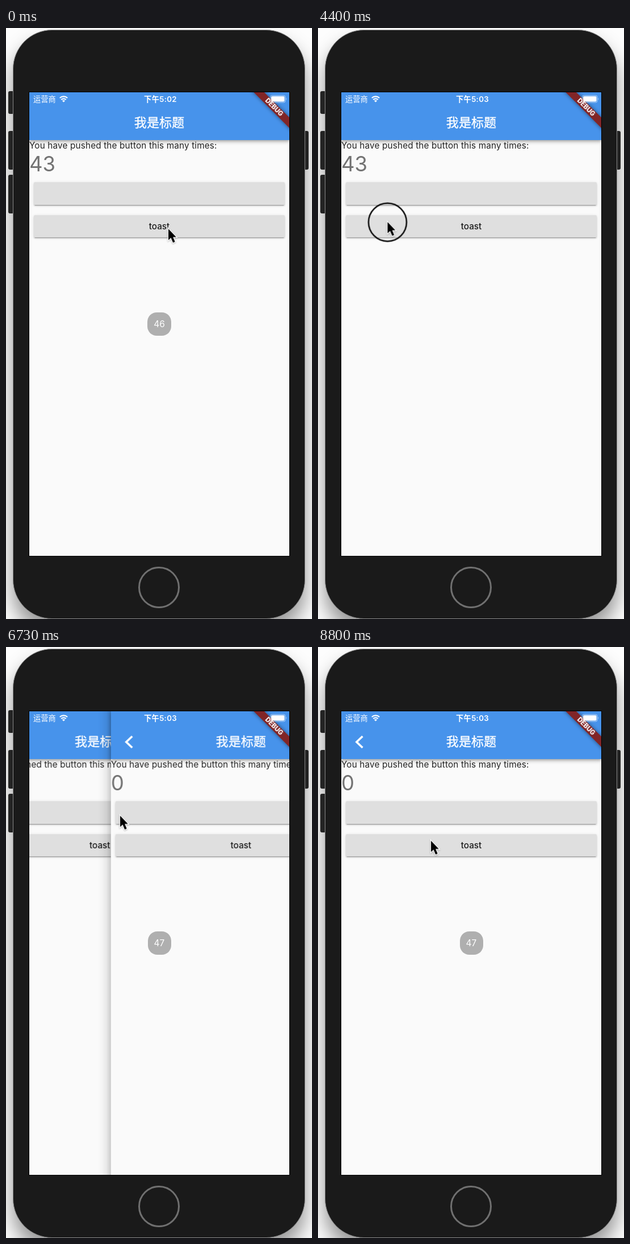
Recreate the animation shown at these times as an HTML page. Size 539 by 1039 pixels, loop 8940 ms.

```html
<!DOCTYPE html>
<html lang="zh-CN">
<head>
<meta charset="utf-8">
<title>Toast demo</title>
<style>
  :root { --loop: 8940ms; --blue: #4793eb; }
  * { box-sizing: border-box; }
  html, body { margin: 0; width: 100%; height: 100%; overflow: hidden; }
  body {
    position: relative;
    background: #fdfdfd;
    font: 15.3px Inter, "Noto Sans CJK SC", "Noto Sans CJK", sans-serif;
    color: #212121;
    white-space: nowrap;
  }
  body *, .page::before { position: absolute; }

  /* phone */
  .phone {
    left: 12px; top: 3px; width: 515px; height: 1036px;
    border-radius: 69px;
    background: #1a1a1a;
    border: 1px solid #8c8c8c;
    box-shadow: 0 22px 34px rgba(0, 0, 0, .42);
  }
  .key { left: 4px; width: 10px; height: 68px; border-radius: 3px; background: #2b2b2b; }
  .home {
    left: 232.5px; top: 946.5px; width: 73px; height: 73px;
    border: 3px solid #707070; border-radius: 50%;
  }
  .screen {
    left: 41px; top: 113px; width: 458px; height: 815px;
    overflow: hidden; background: #fafafa;
    box-shadow: 0 0 0 1px #000;
  }

  /* pages */
  .page { inset: 0; background: #fafafa; }
  .bar {
    left: 0; top: 0; width: 100%; height: 84px;
    background: var(--blue);
    box-shadow: 0 2px 4px -1px rgba(0, 0, 0, .2), 0 4px 5px rgba(0, 0, 0, .14), 0 1px 10px rgba(0, 0, 0, .12);
  }
  .title {
    left: 0; width: 100%; top: 38px; line-height: 30px;
    text-align: center; color: #fff;
    font-size: 22.1px; font-weight: 500;
    -webkit-text-stroke: .35px #fff;
  }
  .label { left: 0; top: 84px; line-height: 20px; letter-spacing: .15px; }
  .count {
    left: 0; top: 104px; line-height: 44px;
    font-size: 36.5px; letter-spacing: -.2px; color: #737373;
  }
  .button {
    left: 8px; width: 442px; top: 158px; height: 39.5px; line-height: 39.5px;
    border-radius: 2px; background: #dfdfdf;
    text-align: center; font-weight: 500; color: #1c1c1c;
    box-shadow: 0 3px 1px -2px rgba(0, 0, 0, .2), 0 2px 2px rgba(0, 0, 0, .14), 0 1px 5px rgba(0, 0, 0, .12);
  }
  .toast-button { top: 215.5px; }
  .back { left: 22px; top: 42px; }
  .old { animation: leave var(--loop) infinite; }
  .new { animation: enter var(--loop) infinite; }
  .new::before {
    content: ""; right: 100%; top: 0; width: 24px; height: 100%;
    background: linear-gradient(to left, rgba(0, 0, 0, .19), rgba(0, 0, 0, .065) 35%, rgba(0, 0, 0, .02) 70%, transparent);
  }
  @keyframes enter {
    0%, 73.535% { transform: translateX(490px); animation-timing-function: step-end; }
    73.536% { transform: translateX(458px); animation-timing-function: ease-out; }
    77.036%, 100% { transform: none; }
  }
  @keyframes leave {
    0%, 73.535% { transform: none; animation-timing-function: ease-out; }
    77.036%, 100% { transform: translateX(-152.7px); }
  }

  /* toasts */
  .toast {
    left: 208px; top: 387px; width: 42px; height: 41px; line-height: 41px;
    border-radius: 16.5px; background: #afafaf; color: #fff;
    text-align: center; font-size: 15.5px;
  }
  .first { animation: hide var(--loop) linear infinite; }
  .second { left: 208.5px; width: 41px; animation: show var(--loop) linear infinite; }
  @keyframes hide { 0%, 46.2% { opacity: 1; } 48.43%, 100% { opacity: 0; } }
  @keyframes show { 0%, 50% { opacity: 0; } 52.8%, 100% { opacity: 1; } }

  /* ribbon and status bar */
  .ribbon {
    left: 381.4px; top: 20.4px; width: 100px; height: 13.3px; line-height: 13.3px;
    transform: rotate(45deg);
    background: #812527; color: #fff;
    box-shadow: 0 0 7px rgba(0, 0, 0, .5);
    text-align: center; font-size: 11.2px; font-weight: 800;
  }
  .status { top: 2px; line-height: 20px; font-size: 13.3px; color: #fff; }
  .carrier { left: 7px; }
  .clock { left: 201px; width: 60px; text-align: center; font-weight: 600; letter-spacing: .3px; }
  .before { animation: until var(--loop) step-end infinite; }
  .after { animation: from var(--loop) step-end infinite; }
  @keyframes until { 0% { opacity: 1; } 13.42%, 100% { opacity: 0; } }
  @keyframes from { 0% { opacity: 0; } 13.42%, 100% { opacity: 1; } }
  .icons { left: 0; top: 0; }

  /* pointer */
  .pointer { left: 0; top: 0; overflow: visible; animation: move var(--loop) ease-in-out infinite; }
  .arrow { filter: drop-shadow(0 1.5px 1px rgba(0, 0, 0, .3)); }
  .ring { animation: press var(--loop) step-end infinite; }
  @keyframes move {
    0%, 36.35% { transform: translate(286px, 351.5px); }
    46.42%, 63.5% { transform: translate(122.5px, 339.5px); animation-timing-function: ease-in; }
    66.33% { transform: translate(151px, 327px); animation-timing-function: ease-out; }
    71.6%, 77.7% { transform: translate(201px, 295px); }
    81.7%, 100% { transform: translate(199px, 339px); }
  }
  @keyframes press {
    0% { opacity: 0; }
    48.43% { opacity: 1; }
    50.1% { opacity: 0; }
    72.4% { opacity: 1; }
    73.7%, 100% { opacity: 0; }
  }
</style>
</head>
<body>
  <div class="key" style="top:111px;height:40px"></div>
  <div class="key" style="top:181px"></div>
  <div class="key" style="top:258px"></div>
  <div class="key" style="top:181px;left:523px"></div>
  <div class="phone"></div>
  <div class="home"></div>

  <div class="screen">
    <div class="page old">
      <div class="bar"><div class="title">我是标题</div></div>
      <div class="label">You have pushed the button this many times:</div>
      <div class="count">43</div>
      <div class="button"></div>
      <div class="button toast-button">toast</div>
    </div>

    <div class="page new">
      <div class="bar">
        <div class="title">我是标题</div>
        <svg class="back" width="20" height="24" fill="none" stroke="#fff" stroke-width="3.6">
          <path d="M15.5 2L5 12L15.5 22"/>
        </svg>
      </div>
      <div class="label">You have pushed the button this many times:</div>
      <div class="count">0</div>
      <div class="button"></div>
      <div class="button toast-button">toast</div>
    </div>

    <div class="toast first">46</div>
    <div class="toast second">47</div>

    <div class="ribbon">DEBUG</div>
    <div class="status carrier">运营商</div>
    <div class="status clock before">下午5:02</div>
    <div class="status clock after">下午5:03</div>
    <svg class="icons" width="458" height="24">
      <g fill="none" stroke="#fff" stroke-width="2.2">
        <path d="M53.8 10A10 10 0 0 1 67.2 10"/>
        <path d="M56.3 13A6.2 6.2 0 0 1 64.7 13"/>
      </g>
      <path d="M60.5 17.4L58 14.9A3.6 3.6 0 0 1 63 14.9Z" fill="#fff"/>
      <rect x="424.5" y="5.5" width="26.5" height="12.5" rx="3" fill="none" stroke="#fff" stroke-opacity=".55"/>
      <rect x="426" y="7" width="23.5" height="9.5" rx="1.8" fill="#fff"/>
      <path d="M452.3 9.8Q454.3 11.7 452.3 13.7Z" fill="#fff" fill-opacity=".5"/>
    </svg>
  </div>

  <svg class="pointer" width="1" height="1">
    <circle class="ring" cy="2" r="33.5" fill="none" stroke="#000" stroke-width="2.4"/>
    <g transform="translate(0 1.5) scale(.9)">
      <path class="arrow" d="M0 0V22L5 17.6L9 27L13 25.3L9 16.2H15.3Z"
        stroke="#fff" stroke-width="3" paint-order="stroke"/>
    </g>
  </svg>
</body>
</html>
```
